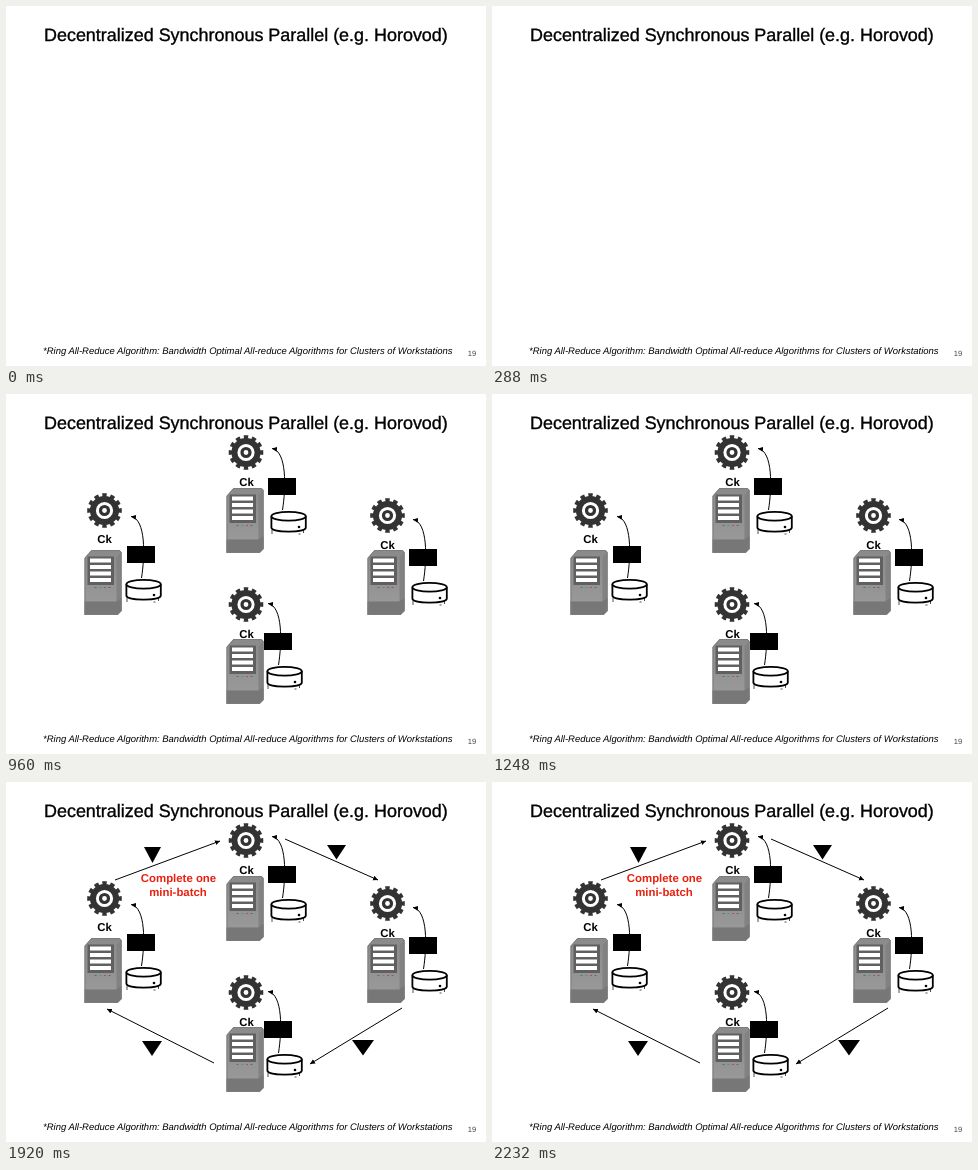
Animation of 480x360 px, one loop 2.44 s. Source, as an HTML page:

```html
<!DOCTYPE html>
<html lang="en">
<head>
<meta charset="utf-8">
<title>Decentralized Synchronous Parallel</title>
<style>
  html, body { margin: 0; width: 100%; height: 100%; overflow: hidden; background: #fff; }
  svg { display: block; width: 100vw; height: 100vh; }
  text { font-family: "Liberation Sans", Arial, sans-serif; text-rendering: geometricPrecision; }
  .title { font-size: 17.95px; stroke: #000; stroke-width: .35px; }
  .note { font-size: 9.47px; font-style: italic; }
  .page { font-size: 7.6px; fill: #444; }
  .label { font-size: 11.4px; font-weight: bold; text-anchor: middle; }
  .red { fill: #e8220f; }
  .arrow { fill: none; stroke: #000; stroke-width: 1; marker-end: url(#head); }
</style>
</head>
<body>
<svg viewBox="0 0 480 360">
  <defs>
    <marker id="head" markerUnits="userSpaceOnUse" markerWidth="6" markerHeight="6"
            refX="5" refY="2.5" orient="auto"><path d="M0 0L5 2.5L0 5Z"/></marker>
    <linearGradient id="metal" x2="0" y2="1">
      <stop stop-color="#8a8a8a"/><stop offset="1" stop-color="#9c9c9c"/>
    </linearGradient>

    <g id="gear" fill="none" stroke="#333">
      <circle r="15.2" stroke-width="4.2"
              pathLength="24" stroke-dasharray="1.1 .9" stroke-dashoffset=".55"/>
      <circle r="11.6" stroke-width="6"/>
      <circle r="4" stroke-width="3.2"/>
    </g>

    <g id="server">
      <path d="M0 8L7 0H35L37 2V61L33 65H0Z" fill="url(#metal)"/>
      <path d="M32 7L37 2V61L33 65H32Z" fill="#828282"/>
      <path d="M0 51.5H32L37 48V61L33 65H0Z" fill="#777"/>
      <path d="M.5 8V64.5H33L36.5 61V2L35 .5H7Z" fill="none" stroke="#7c7c7c"/>
      <rect x="3" y="6.5" width="26.5" height="28.5" fill="#606060"/>
      <path d="M5.5 10.5H26.5M5.5 17H26.5M5.5 23.5H26.5M5.5 30H26.5" stroke="#fff" stroke-width="4"/>
      <path d="M10 37.5H12" stroke="#666"/>
      <path d="M15 37.5H17" stroke="#499"/>
      <path d="M19.5 37.5H21.5" stroke="#c44"/>
      <path d="M24 37.5H26" stroke="#666"/>
    </g>

    <g id="disk" fill="#fff" stroke="#000" stroke-width="1.8">
      <path d="M.9 4.3V15.5C.9 20.9 35.3 20.9 35.3 15.5V4.3"/>
      <ellipse cx="18.1" cy="4.3" rx="17.2" ry="4.4"/>
      <circle cx="28.5" cy="15" r="1.3" fill="#000" stroke="none"/>
      <path d="M1.5 18V22M33 18V21M28 22H30" stroke-width=".7"/>
    </g>

    <g id="batch">
      <path class="arrow" d="M14.5 32C18 10 19 -27 4 -29.5"/>
      <rect width="28" height="17"/>
    </g>
  </defs>

  <rect width="480" height="360" fill="#fff"/>
  <text class="title" x="38" y="35">Decentralized Synchronous Parallel (e.g. Horovod)</text>
  <text class="note" x="37" y="348">*Ring All-Reduce Algorithm: Bandwidth Optimal All-reduce Algorithms for Clusters of Workstations</text>
  <text class="page" x="461.8" y="350.3">19</text>

  <g class="step" id="workers"></g>
  <g class="step" id="batches"></g>
  <g class="step">
    <text class="label red" x="172.5" y="100">Complete one</text>
    <text class="label red" x="172" y="114">mini-batch</text>
  </g>
  <g class="step">
    <path class="arrow" d="M109 98L214 59"/>
    <path class="arrow" d="M279 57L372 98"/>
    <path class="arrow" d="M396 226L304 282"/>
    <path class="arrow" d="M208 281L101 227"/>
    <path d="M138 65h17l-8.5 16ZM321 63h19l-9.5 14.5ZM346 258h22l-11 15.5ZM136 259h20l-10 15Z"/>
  </g>
</svg>
<script>
  const LOOP = 2440, STEP = 480;
  const workers = [
    { gear: [98.5, 116.5], label: [98.5, 149], server: [78.5, 156], disk: [119.5, 186], batch: [121, 152] },
    { gear: [240, 58.5], label: [240.5, 92], server: [220.5, 94], disk: [264.5, 118], batch: [262, 84] },
    { gear: [381.5, 121.5], label: [381.5, 155], server: [361.5, 156], disk: [405.5, 189], batch: [403, 155] },
    { gear: [240, 210.5], label: [240.5, 244], server: [220.5, 245], disk: [260.5, 273], batch: [258, 239] },
  ];
  const place = (id, [x, y]) => `<use href="#${id}" x="${x}" y="${y}"/>`;

  document.getElementById("workers").innerHTML = workers.map(w =>
    ["gear", "server", "disk"].map(id => place(id, w[id])).join("") +
    `<text class="label" x="${w.label[0]}" y="${w.label[1]}">Ck</text>`).join("");
  document.getElementById("batches").innerHTML = workers.map(w => place("batch", w.batch)).join("");

  const steps = document.querySelectorAll(".step");
  const start = performance.now();

  function draw() {
    const time = (performance.now() - start) % LOOP;
    steps.forEach((step, i) => {
      step.style.display = time >= (i + 1) * STEP ? "" : "none";
    });
    requestAnimationFrame(draw);
  }
  draw();
</script>
</body>
</html>
```
